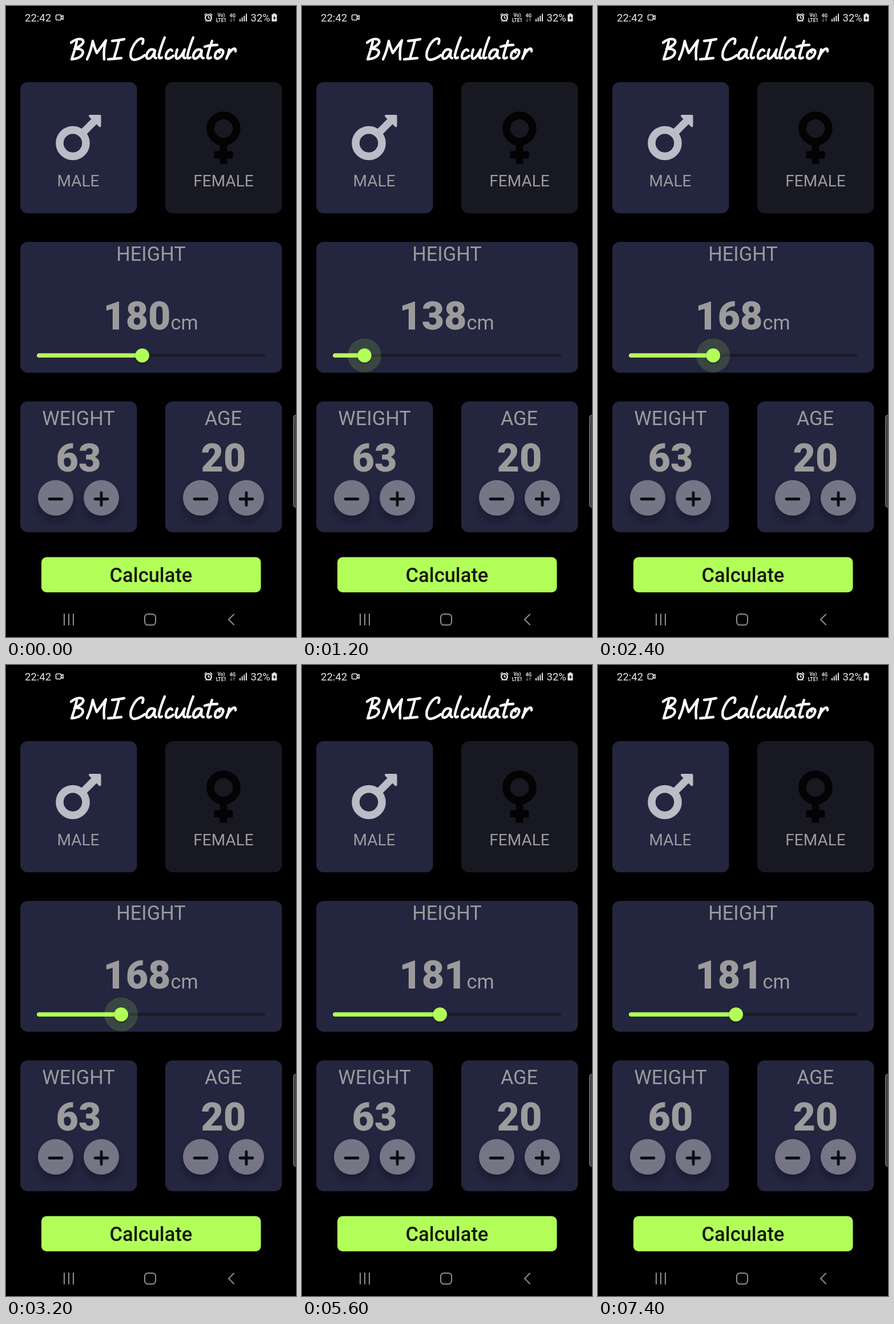
These frames come from a looping animation (508 px wide and 1102 px high, 8000 ms). An HTML page:

```html
<!DOCTYPE html>
<html lang="en">
<head>
<meta charset="utf-8">
<title>BMI Calculator</title>
<style>
  html, body { margin: 0; width: 100%; height: 100%; overflow: hidden; background: #000; }
  svg { display: block; width: 100vw; height: 100vh; font-family: Roboto, "Open Sans", sans-serif; }
  .card { fill: #24253f; }
  .label { fill: #9b9b9c; text-anchor: middle; }
  .big { font-size: 34.4px; }
  .small { font-size: 28px; }
  .number { font-size: 68px; font-weight: 900; fill: #9b9b9c; text-anchor: middle; }
  .lime { fill: #b2ff59; }
  .line { fill: none; stroke-linecap: round; stroke-linejoin: round; }
  .status { fill: #e8e8e8; }
  .tiny { font-size: 8.3px; font-weight: 700; text-anchor: middle; }
</style>
</head>
<body>
<svg viewBox="0 0 508 1102" preserveAspectRatio="none">
  <defs>
    <filter id="soft" x="-50%" y="-50%" width="200%" height="200%">
      <feGaussianBlur stdDeviation="6"/>
    </filter>
    <filter id="thumbSoft" x="-50%" y="-50%" width="200%" height="200%">
      <feGaussianBlur stdDeviation="1.6"/>
    </filter>
    <g id="button">
      <circle cy="9" r="30" fill="#10101c" opacity=".5" filter="url(#soft)"/>
      <circle r="31" fill="#767586"/>
      <path class="line" d="M-11 2H11" stroke="#0b0c10" stroke-width="4.8"/>
    </g>
  </defs>
  <rect width="508" height="1102"/>

  <!-- status bar -->
  <g class="status">
    <text x="33" y="27" font-size="18.5">22:42</text>
    <g class="line" stroke="#e8e8e8" stroke-width="1.6">
      <rect x="87.5" y="15.5" width="9" height="9" rx="1.5"/>
      <path d="M97 18.5L100 16.5V23.5L97 21.5"/>
      <circle cx="354.5" cy="20.5" r="5.4" stroke-width="2.2"/>
      <path d="M354.5 17.5V21H357M348 16L351 13M361 16L358 13M350 26.5L351.5 25M359 26.5L357.5 25"/>
    </g>
    <text class="tiny" x="377" y="19">Vo)</text>
    <text class="tiny" x="377" y="27.5">LTE1</text>
    <text class="tiny" x="397" y="19.5">4G</text>
    <path id="arrows" class="line" stroke-width="1.3"
      d="M394.5 22V27M392.8 25.4L394.5 27L396.2 25.4M399.5 27V22M397.8 23.6L399.5 22L401.2 23.6"/>
    <path d="M409 23h2v4h-2zM412.7 20h2v7h-2zM416.4 17h2v10h-2zM420.1 13.5h2v13.5h-2z"/>
    <text x="428.5" y="27" font-size="18.5">32%</text>
    <path d="M468 13h4v1.5h2.5v12.5h-9V14.5H468z"/>
    <path d="M471 16.5L467.5 21.5H470L469 25.5L473 20H470.5z" fill="#111"/>
  </g>

  <!-- hand-lettered heading -->
  <g class="line" role="img" aria-label="BMI Calculator" stroke="#fff" stroke-width="4.4">
    <path d="M124 62Q120 79 115 93M114 64Q125 55 134 59Q140 66 120 75Q138 74 134 84Q130 92 115 93"/>
    <path d="M142 93Q149 78 152 61Q155 73 159 82Q167 71 175 60Q170 78 172 93"/>
    <path d="M186 61Q197 60 207 58M198 60Q194 76 189 92M179 93Q190 92 202 91"/>
    <path d="M239 66Q243 56 236 57Q226 60 219 79Q216 94 225 94Q234 93 243 86"/>
    <path d="M260 77Q252 73 247 83Q244 92 250 92Q257 90 261 78Q258 91 263 91"/>
    <path d="M278 55Q271 72 268 85Q267 94 273 90"/>
    <path d="M291 78Q288 73 282 81Q277 92 284 92Q289 91 293 87"/>
    <path d="M300 76Q295 91 300 92Q306 91 313 76Q308 91 314 91"/>
    <path d="M328 55Q321 72 318 86Q317 94 323 90"/>
    <path d="M342 77Q334 73 329 83Q326 92 332 92Q339 90 343 78Q340 91 346 91"/>
    <path d="M361 61Q355 78 353 87Q352 94 359 90M348 71Q358 68 370 68"/>
    <path d="M375 76Q366 79 366 89Q369 95 377 88Q384 78 377 76Q372 77 374 81"/>
    <path d="M391 76Q390 84 386 92Q391 79 398 75Q403 73 402 79"/>
  </g>

  <!-- gender cards -->
  <rect class="card" x="25" y="133" width="204.5" height="229" rx="13"/>
  <rect x="279" y="133" width="204.5" height="229" rx="13" fill="#181823"/>
  <g class="line" stroke="#bbbcc6">
    <circle cx="117" cy="239.5" r="23" stroke-width="13.5"/>
    <path d="M134 222L157 199" stroke-width="13" stroke-linecap="butt"/>
    <path d="M147 192H164.5V209.5z" fill="#bbbcc6" stroke-width="4"/>
  </g>
  <g class="line" stroke="#030304" stroke-width="13">
    <circle cx="381" cy="214" r="23" stroke-width="13.5"/>
    <path d="M381 238V274M366 260H396" stroke-linecap="butt"/>
    <path d="M366 255V265M396 255V265M376 274H386" stroke-width="3"/>
  </g>
  <text class="label small" x="126.5" y="315">MALE</text>
  <text class="label small" x="381" y="315">FEMALE</text>

  <!-- height card -->
  <rect class="card" x="25" y="412" width="458.5" height="228.5" rx="13"/>
  <text class="label big" x="254" y="444.5">HEIGHT</text>
  <text class="number" id="height" x="288.5" y="565" style="text-anchor:end"></text>
  <text class="label big" x="288.5" y="565" style="text-anchor:start">cm</text>
  <rect x="54" y="607.8" width="400" height="4.8" rx="2.4" fill="#191927"/>
  <rect class="lime" id="fill" x="54" y="606.4" height="7.6" rx="3.8"/>
  <g id="thumb">
    <circle class="lime" id="halo" opacity=".15"/>
    <circle cy="2" r="12" fill="#000" opacity=".45" filter="url(#thumbSoft)"/>
    <circle class="lime" r="12.3"/>
  </g>

  <!-- weight and age cards -->
  <rect class="card" x="25" y="690.5" width="204.5" height="228.5" rx="13"/>
  <rect class="card" x="279" y="690.5" width="204.5" height="228.5" rx="13"/>
  <text class="label big" x="127" y="732">WEIGHT</text>
  <text class="label big" x="380.5" y="732">AGE</text>
  <text class="number" id="weight" x="127" y="812.5"></text>
  <text class="number" x="381" y="812.5">20</text>
  <use href="#button" x="87" y="859"/>
  <use href="#button" x="167" y="859"/>
  <use href="#button" x="341" y="859"/>
  <use href="#button" x="421" y="859"/>
  <path class="line" d="M167 850V872M421 850V872" stroke="#0b0c10" stroke-width="4.8"/>

  <rect class="lime" x="62" y="962.5" width="384.5" height="61.5" rx="9"/>
  <text x="254" y="1005.5" font-size="34.5" font-weight="500" text-anchor="middle" fill="#12180a">Calculate</text>

  <!-- edge handle and navigation bar -->
  <rect x="503.5" y="714.5" width="12" height="161" rx="4" fill="#454545" stroke="#858585"/>
  <g class="line" stroke="#8b8b8b" stroke-width="2.1">
    <path d="M102 1062V1081M110 1062V1081M118 1062V1081M399 1062.5L390 1071.5L399 1080.5"/>
    <rect x="243" y="1062" width="19" height="19" rx="5.5"/>
  </g>
</svg>
<script>
  const LOOP = 8000, STEP = 100;
  const MIN = 120, MAX = 250, TRACK_X = 54, TRACK_W = 400;
  const $ = id => document.getElementById(id);

  // [ms, value] points of the drag and of the halo radius
  const drag = [
    [500, 180], [600, 179], [700, 175], [800, 169], [1000, 148], [1300, 133],
    [1400, 152], [1500, 190], [1600, 217], [1800, 217], [1900, 179], [2000, 172],
    [2400, 168], [2500, 168], [2600, 178], [2700, 192], [2900, 210], [3100, 210],
    [3200, 168], [3300, 171], [3600, 195], [3700, 198], [3800, 198], [4000, 187],
    [4100, 187], [4200, 178], [4400, 174], [4700, 181]
  ];
  const press = [[400, 0], [600, 29.5], [5200, 29.5], [5600, 0]];

  function sample(points, t) {
    const next = points.findIndex(p => p[0] > t);
    if (next === 0) return points[0][1];
    if (next < 0) return points[points.length - 1][1];
    const [t0, a] = points[next - 1], [t1, b] = points[next];
    return a + (b - a) * (t - t0) / (t1 - t0);
  }

  function draw(time) {
    const t = Math.floor(time / STEP) * STEP;
    const value = sample(drag, t);
    const length = (value - MIN) / (MAX - MIN) * TRACK_W;
    $('height').textContent = Math.round(value);
    $('fill').setAttribute('width', length);
    $('thumb').setAttribute('transform', `translate(${TRACK_X + length} 610.2)`);
    $('halo').setAttribute('r', t < 500 ? 0 : sample(press, t));
    $('weight').textContent = 63 - [6900, 7100, 7300].filter(tap => t >= tap).length;
    $('arrows').setAttribute('stroke', t >= 4200 && t < 4700 ? '#e8e8e8' : '#666');
  }

  const start = performance.now();
  function tick() {
    draw((performance.now() - start) % LOOP);
    requestAnimationFrame(tick);
  }
  tick();
</script>
</body>
</html>
```
